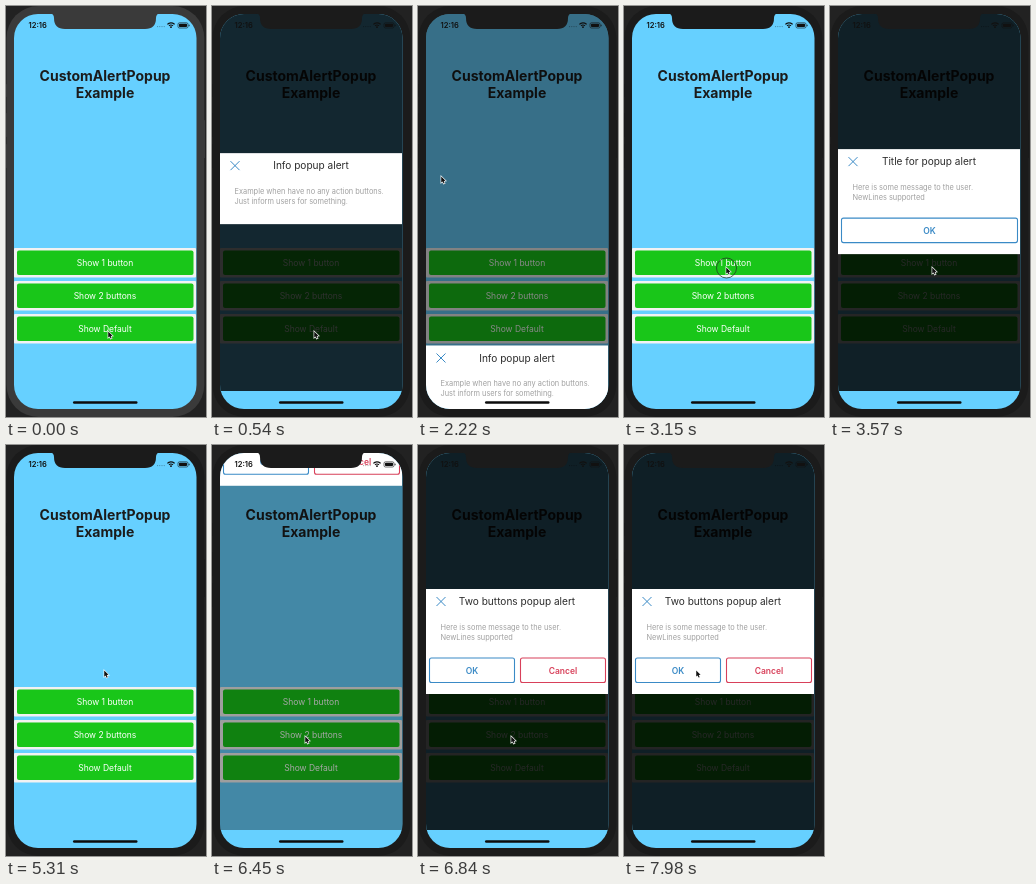
Recreate the animation shown at these times as an HTML page with a canvas. Size 200x411 px, loop 8000 ms.

```html
<!DOCTYPE html>
<html>
<head>
<meta charset="utf-8">
<title>Custom alert popup</title>
<style>
  html, body { margin: 0; width: 100%; height: 100%; overflow: hidden; background: #222; }
  canvas { display: block; width: 200px; height: 411px; }
</style>
</head>
<body>
<canvas id="stage"></canvas>
<script>
const W = 200, H = 411, LOOP = 8000;
const SLIDE = 300, TRAVEL = 395, DIM = 0.85;
const FOCUS_AT = 150;
const BLUE = '#3a8ac6', RED = '#d8405a';

const canvas = document.getElementById('stage');
const ctx = canvas.getContext('2d');
const scale = window.devicePixelRatio || 1;
canvas.width = W * scale;
canvas.height = H * scale;

const popups = [
  { open: 312, close: 2140, y: 161, h: 71, title: 'Info popup alert',
    lines: ['Example when have no any action buttons.', 'Just inform users for something.'],
    buttons: [] },
  { open: 3290, close: 4960, y: 144, h: 105, title: 'Title for popup alert',
    lines: ['Here is some message to the user.', 'NewLines supported'],
    buttons: [{ x: 11.5, w: 176, label: 'OK', color: BLUE }] },
  { open: 6367, close: Infinity, y: 144, h: 105, title: 'Two buttons popup alert',
    lines: ['Here is some message to the user.', 'NewLines supported'],
    buttons: [{ x: 11.5, w: 85, label: 'OK', color: BLUE },
              { x: 102.5, w: 85, label: 'Cancel', color: RED }] }
];

// time, x, y of the pointer tip
const path = [
  [0, 102, 325], [900, 102, 325], [1800, 23, 170], [2400, 23, 170],
  [3000, 102, 261], [3600, 102, 261], [4300, 98, 225], [5300, 98, 225],
  [6000, 93, 291], [6900, 93, 291], [7700, 72, 225], [8000, 72, 225]
];
const presses = [[130, 260], [1990, 2110], [3100, 3220], [4800, 4920], [6200, 6320]];

const clamp = v => Math.min(1, Math.max(0, v));

// cubic-bezier(.25, .1, .25, 1), solved for x by bisection
function ease(x) {
  x = clamp(x);
  const curve = (a, b, s) => 3 * a * s * (1 - s) ** 2 + 3 * b * s * s * (1 - s) + s ** 3;
  let lo = 0, hi = 1;
  for (let i = 0; i < 20; i++) {
    const mid = (lo + hi) / 2;
    if (curve(0.25, 0.25, mid) < x) lo = mid; else hi = mid;
  }
  return curve(0.1, 1, lo);
}

function rounded(x, y, w, h, r) {
  ctx.beginPath();
  ctx.roundRect(x, y, w, h, r);
}

function box(x, y, w, h, r, color) {
  rounded(x, y, w, h, r);
  ctx.fillStyle = color;
  ctx.fill();
}

function text(str, x, y, size, color, weight = 400, align = 'center') {
  ctx.font = `${weight} ${size}px Inter, Roboto, sans-serif`;
  ctx.textAlign = align;
  ctx.fillStyle = color;
  ctx.fillText(str, x, y);
}

function drawPage() {
  ctx.fillStyle = '#66d0ff';
  ctx.fillRect(8, 8, 183, 396);
  text('CustomAlertPopup', 99, 74.5, 14, '#1b1b1b', 700);
  text('Example', 99, 92, 14, '#1b1b1b', 700);
  ['Show 1 button', 'Show 2 buttons', 'Show Default'].forEach((label, i) => {
    const y = 242 + i * 33;
    box(8, y, 182, 29.5, 1, '#f2f2f2');
    box(11, y + 2.5, 176.5, 24.5, 2, '#19c619');
    text(label, 99, y + 17.8, 8.5, '#fff');
  });
}

function drawPopup(p, y) {
  ctx.fillStyle = '#fff';
  ctx.fillRect(8, y, 182, p.h);
  ctx.strokeStyle = BLUE;
  ctx.lineWidth = 1;
  ctx.beginPath();
  ctx.moveTo(18.5, y + 8); ctx.lineTo(27.5, y + 17);
  ctx.moveTo(27.5, y + 8); ctx.lineTo(18.5, y + 17);
  ctx.stroke();
  text(p.title, 99, y + 16.3, 10.1, '#2c2c2c');
  p.lines.forEach((line, i) => text(line, 22.5, y + 41 + i * 9.6, 7.4, '#a0a0a0', 400, 'left'));
  for (const b of p.buttons) {
    rounded(b.x, y + 69, b.w, 24.5, 2);
    ctx.strokeStyle = b.color;
    ctx.lineWidth = 1.1;
    ctx.stroke();
    text(b.label, b.x + b.w / 2, y + 84.5, 8.5, b.color, 600);
  }
}

function drawModal(t) {
  for (const p of popups) {
    if (t < p.open || t > p.close + SLIDE) continue;
    const into = (t - p.open) / SLIDE, out = ease((t - p.close) / SLIDE);
    ctx.fillStyle = `rgba(0,0,0,${DIM * ease(into - 0.03) * (1 - out)})`;
    ctx.fillRect(8, 8, 183, 377);
    drawPopup(p, p.y + TRAVEL * (ease(into) - 1 + out));
  }
}

function drawStatus() {
  const ink = '#111';
  text('12:16', 22.5, 22, 7.6, ink, 600, 'left');
  for (let i = 0; i < 4; i++) box(151 + i * 2.2, 20, 1.2, 1.2, 0.6, 'rgba(0,0,0,.35)');
  ctx.strokeStyle = ink;
  ctx.lineWidth = 1.2;
  for (const r of [2.6, 4.8]) {
    ctx.beginPath();
    ctx.arc(165, 21.6, r, -Math.PI * 0.77, -Math.PI * 0.23);
    ctx.stroke();
  }
  box(164, 20.2, 2, 1.8, 0.9, ink);
  rounded(172, 16.8, 10, 5.2, 1.5);
  ctx.lineWidth = 0.6;
  ctx.stroke();
  box(173, 17.7, 8, 3.4, 0.8, ink);
  box(182.7, 18.5, 0.8, 1.8, 0.4, ink);
  box(67, 395.3, 64.5, 2.4, 1.2, '#0c0c0c');
}

function drawNotch(color) {
  ctx.beginPath();
  ctx.moveTo(44, 7);
  ctx.quadraticCurveTo(48, 8, 48, 12);
  ctx.quadraticCurveTo(48, 23, 59, 23);
  ctx.lineTo(139, 23);
  ctx.quadraticCurveTo(150, 23, 150, 12);
  ctx.quadraticCurveTo(150, 8, 154, 7);
  ctx.fillStyle = color;
  ctx.fill();
}

function pointerAt(t) {
  const i = Math.max(1, path.findIndex(k => k[0] >= t));
  const [t0, x0, y0] = path[i - 1], [t1, x1, y1] = path[i];
  const u = clamp((t - t0) / (t1 - t0)), s = u * u * (3 - 2 * u);
  return [x0 + (x1 - x0) * s, y0 + (y1 - y0) * s];
}

function drawPointer(t) {
  const [x, y] = pointerAt(t);
  if (presses.some(([a, b]) => t >= a && t < b)) {
    ctx.beginPath();
    ctx.arc(x + 0.5, y + 1, 10, 0, Math.PI * 2);
    ctx.strokeStyle = 'rgba(40,50,40,.75)';
    ctx.lineWidth = 1;
    ctx.stroke();
  }
  ctx.save();
  ctx.translate(x, y + 0.5);
  ctx.scale(0.8, 0.8);
  ctx.beginPath();
  ctx.moveTo(0.3, 0);
  ctx.lineTo(0.3, 7.6);
  ctx.lineTo(2, 6.1);
  ctx.lineTo(3.3, 8.9);
  ctx.lineTo(4.6, 8.3);
  ctx.lineTo(3.4, 5.6);
  ctx.lineTo(5.7, 5.4);
  ctx.closePath();
  ctx.strokeStyle = '#fff';
  ctx.lineWidth = 1.6;
  ctx.stroke();
  ctx.fillStyle = '#111';
  ctx.fill();
  ctx.restore();
}

function draw(t) {
  const bezel = t < FOCUS_AT ? '#3a3a3a' : '#1b1b1b';
  ctx.setTransform(scale, 0, 0, scale, 0, 0);
  ctx.fillStyle = '#222';
  ctx.fillRect(0, 0, W, H);
  for (const [y, h] of [[78, 13], [107, 24], [138, 24]]) box(0, y, 2, h, 0.5, bezel);
  box(197, 114, 2, 38, 0.5, bezel);
  box(0.5, 0, 197.8, 411, 32, bezel);

  ctx.save();
  rounded(8, 8, 182.5, 395, 24);
  ctx.clip();
  drawPage();
  drawModal(t);
  drawStatus();
  ctx.restore();

  drawNotch(bezel);
  drawPointer(t);
}

function tick() {
  draw(performance.now() % LOOP);
  requestAnimationFrame(tick);
}
tick();
</script>
</body>
</html>
```
